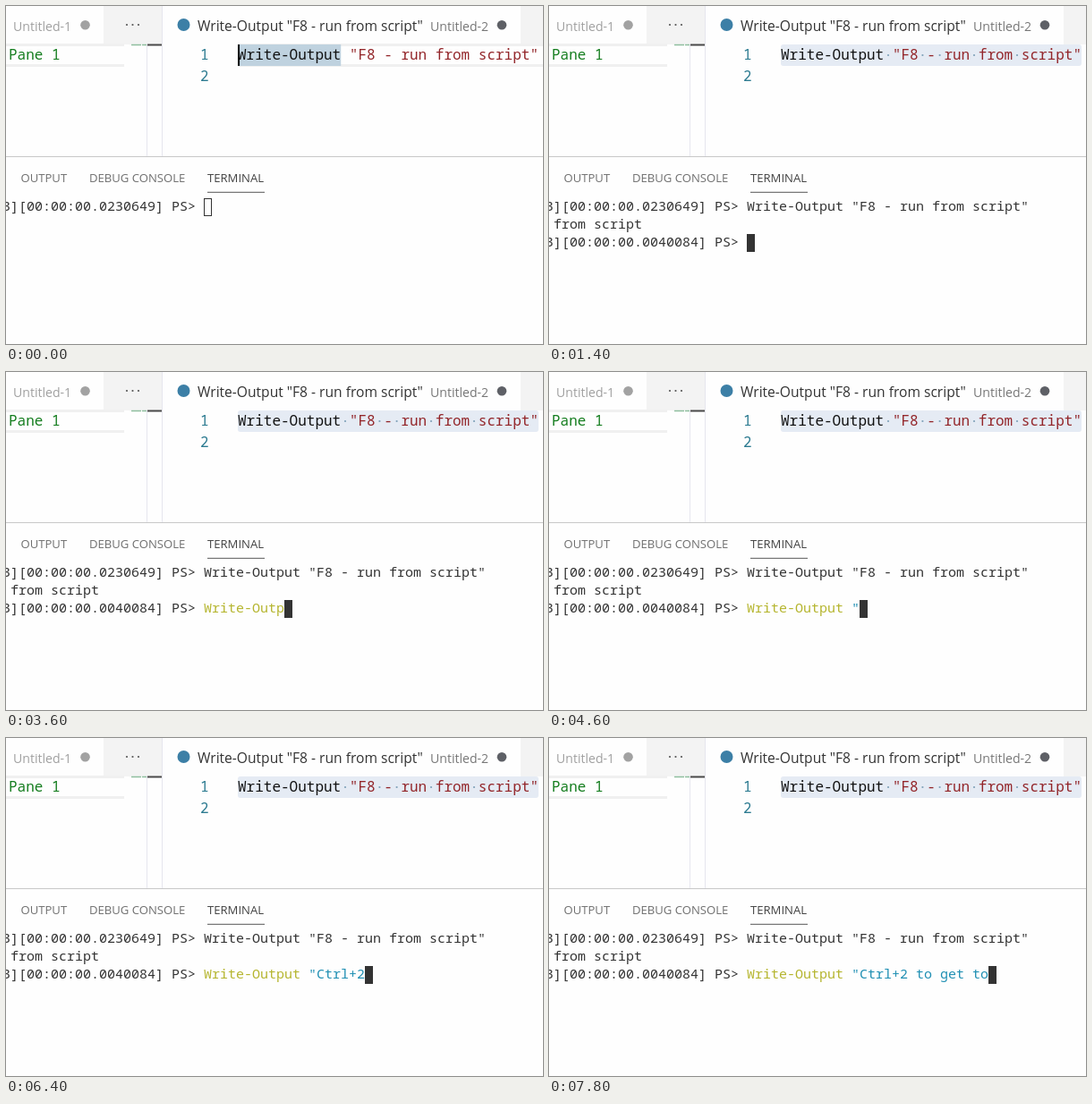
Animation of 600 by 378 pixels, one loop 8 s. Source, as an HTML page:

```html
<!DOCTYPE html>
<html lang="en">
<head>
<meta charset="utf-8">
<title>Editor and terminal</title>
<style>
  html, body { margin: 0; width: 100%; height: 100%; overflow: hidden; background: #fefefe; }
  svg { display: block; width: 600px; height: 378px; }
  text { white-space: pre; }
  .ui { font-family: "Open Sans", "Noto Sans", sans-serif; }
  .tab { font-size: 14.1px; }
  .panel { font-size: 13.1px; fill: #707070; }
  .code { font: 16px "Noto Sans Mono", "Liberation Mono", monospace; }
  .term { font: 15px "Noto Sans Mono", "Liberation Mono", monospace; fill: #333; }
</style>
</head>
<body>
<svg viewBox="0 0 600 378">
  <rect width="600" height="378" fill="#fefefe"/>

  <!-- Tab bars -->
  <path d="M109 0H174V43H109ZM575 0H600V43H575Z" fill="#f3f3f3"/>
  <g class="ui">
    <text class="tab" x="8" y="27.5" fill="#a0a0a0">Untitled-1</text>
    <text x="214" y="27.5" font-size="15.6" fill="#333">Write-Output "F8 - run from script"</text>
    <text class="tab" x="474" y="27.5" fill="#777">Untitled-2</text>
  </g>
  <circle cx="88.5" cy="21.3" r="5.3" fill="#a2a2a2"/>
  <circle cx="554" cy="21.3" r="5.3" fill="#5e6066"/>
  <circle cx="198.5" cy="21" r="7" fill="#3c7fa6"/>
  <g fill="#555">
    <circle cx="135" cy="21" r="1.1"/><circle cx="141.5" cy="21" r="1.1"/><circle cx="148" cy="21" r="1.1"/>
  </g>

  <!-- Left editor -->
  <path d="M0 43.5H132M0 66.5H132" stroke="#f0f0f0" stroke-width="3"/>
  <path d="M157.5 43V168M174.5 0V168" stroke="#e6e6ee"/>
  <path d="M140 43.5H157" stroke="#8fbf9f" stroke-width="1.5" stroke-dasharray="11 1"/>
  <path d="M158 43.5H174" stroke="#484848" stroke-width="2"/>
  <text class="code" x="3" y="60" fill="#147d1e">Pane 1</text>

  <!-- Right editor -->
  <path id="lineMark" d="M259 43.5H600M259 66.5H600" stroke="#f0f0f0" stroke-width="3"/>
  <rect id="highlight" x="259" y="43" height="24"/>
  <g id="dots" fill="#7fa0b8"></g>
  <g class="code">
    <text x="217" y="60" fill="#2b7a90">1</text>
    <text x="217" y="84" fill="#2b7a90">2</text>
    <text x="259" y="60" fill="#111">Write-Output <tspan fill="#93262a">"F8 - run from script"</tspan></text>
  </g>
  <rect id="caret" y="43" width="2" height="24" fill="#000"/>

  <!-- Panel -->
  <path d="M0 168.5H600" stroke="#c8c8c8"/>
  <g class="ui panel">
    <text x="16.5" y="196.5">OUTPUT</text>
    <text x="93" y="196.5">DEBUG CONSOLE</text>
    <text x="225" y="196.5" fill="#424242">TERMINAL</text>
  </g>
  <path d="M225 208.3H289" stroke="#555"/>
  <g class="term">
    <text x="-4" y="228.5">3][00:00:00.0230649] PS&gt; <tspan id="echo"></tspan></text>
    <text id="output" x="-76" y="248.5">F8 - run from script</text>
    <text id="prompt" x="-4" y="268.5">3][00:00:00.0040084] PS&gt; </text>
    <text x="221" y="268.5" fill="#b5b52e" id="command"></text>
    <text x="338" y="268.5" fill="#1f8fb3" id="string"></text>
  </g>
  <rect id="block" stroke="#333"/>
</svg>
<script>
const LOOP = 8000;
const EDITOR_X = 259, EDITOR_CELL = 9.6, TERM_X = 221, TERM_CELL = 9;
const CODE = 'Write-Output "F8 - run from script"';
const TYPED = 'Write-Output "Ctrl+2 to get to';
const COMMAND_LENGTH = 13;

// Bursts of typing: start time, then characters present at each 200 ms step.
const BURSTS = [
  [2200, [1, 2, 3, 5, 6, 7, 9, 10, 12, 13]],
  [4400, [14]],
  [5000, [15, 16, 17, 18]],
  [6200, [19, 20, 21, 23, 25, 26, 28, 29, 30]],
];

const $ = id => document.getElementById(id);
const show = (id, on) => $(id).setAttribute('visibility', on ? 'visible' : 'hidden');
const set = (id, attrs) => {
  for (const name in attrs) $(id).setAttribute(name, attrs[name]);
};

$('dots').innerHTML = [...CODE].map((char, i) => char === ' '
  ? `<circle cx="${EDITOR_X + (i + 0.5) * EDITOR_CELL}" cy="55" r="1.1"/>` : '').join('');

function typedCount(t) {
  let count = 0;
  for (const [start, counts] of BURSTS) {
    if (t >= start) count = counts[Math.min(Math.floor((t - start) / 200), counts.length - 1)];
  }
  return count;
}

function render(t) {
  const selected = t >= 400, ran = t >= 1200, done = t >= 1400;
  const length = selected ? CODE.length : 12;

  show('lineMark', !selected);
  show('dots', selected);
  set('highlight', {
    width: length * EDITOR_CELL,
    rx: selected ? 3 : 0,
    fill: ran ? '#e5ebf4' : selected ? '#add6ff' : '#bfd2df',
  });
  show('caret', t < 200 || (t >= 400 && t < 800));
  set('caret', { x: selected ? EDITOR_X + length * EDITOR_CELL : EDITOR_X });

  const count = typedCount(t);
  $('echo').textContent = ran ? CODE : '';
  show('output', done);
  show('prompt', done);
  $('command').textContent = TYPED.slice(0, Math.min(count, COMMAND_LENGTH));
  $('string').textContent = TYPED.slice(COMMAND_LENGTH, Math.max(count, COMMAND_LENGTH));

  show('block', !ran || done);
  set('block', {
    x: TERM_X + count * TERM_CELL + 0.5,
    y: done ? 255.5 : 215.5,
    width: 8,
    height: 19,
    fill: done ? '#333' : 'none',
  });
}

const begin = performance.now();
function frame() {
  render((performance.now() - begin) % LOOP);
  requestAnimationFrame(frame);
}
render(0);
requestAnimationFrame(frame);
</script>
</body>
</html>
```
